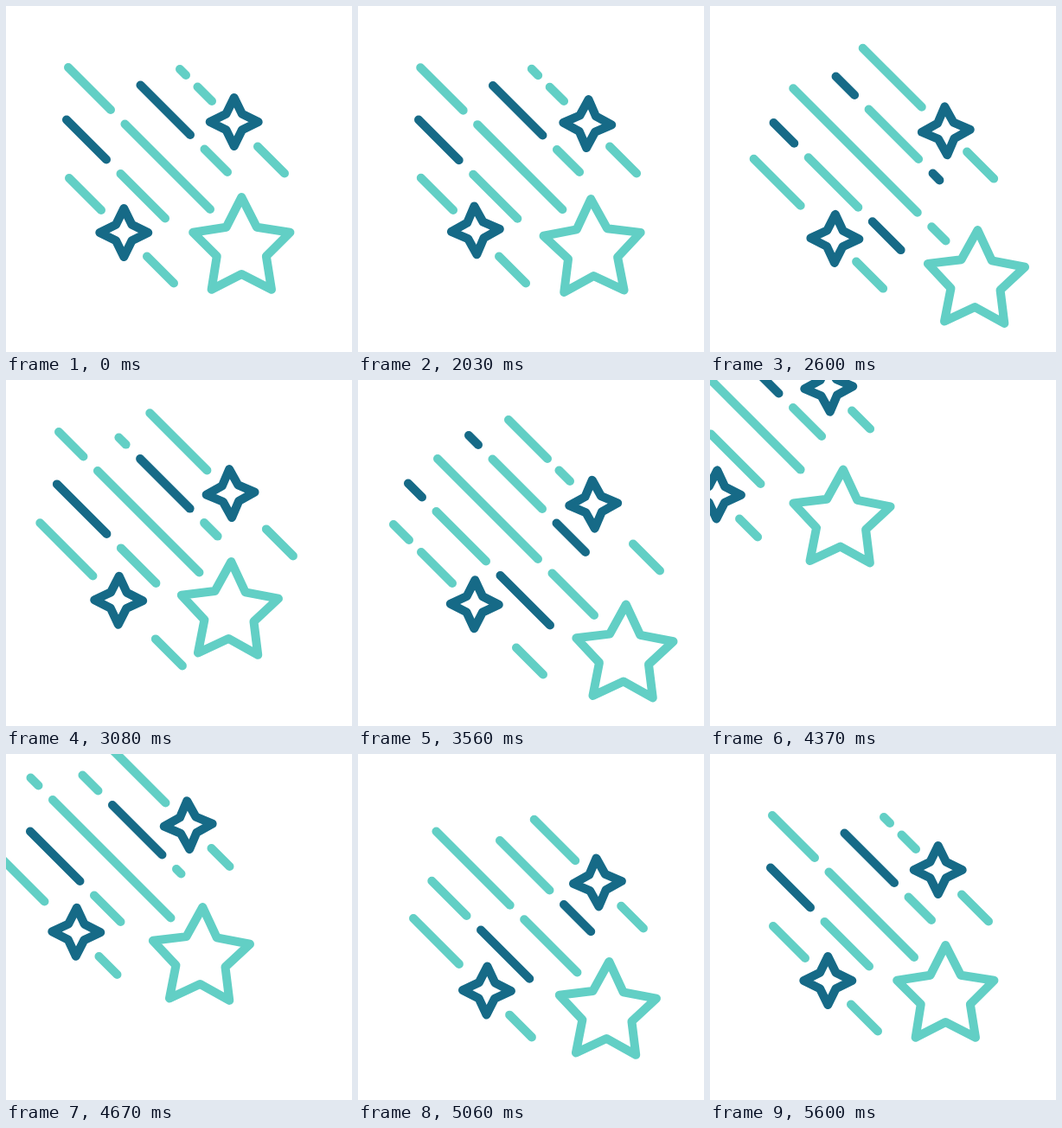
An HTML page with a canvas that plays this animation: 400 by 400 pixels, repeating every 5660 ms.

```html
<!DOCTYPE html>
<html lang="en">
<head>
<meta charset="utf-8">
<title>Shooting stars</title>
<style>
  html, body { margin: 0; height: 100%; overflow: hidden; background: #fff; }
  canvas { display: block; }
</style>
</head>
<body>
<canvas width="400" height="400"></canvas>
<script>
const ctx = document.querySelector('canvas').getContext('2d');
const LIGHT = '#62cfc5', DARK = '#166a87';
const REST = 2030, STEP = 30, LOOP = 5660, LAST = 120;

const clamp = u => Math.max(0, Math.min(1, u));
const smooth = u => { u = clamp(u); return u * u * (3 - 2 * u); };
const mix = (a, b, u) => a + (b - a) * u;

// Diagonal offsets: lunge, wind-up, launch, and lag behind the star on return
const STAR = [38, -14, 37, 0], UPPER = [10, -4, 9, -7], LOWER = [8, -7, -2, -10];

// Dashes flow along each track, relative to the track's front end
const FLOW_STEPS = [0, 36, 52, 89, LAST];
const MAIN_FLOW = [0, 159, 215, 317, 444];

const tracks = [
  { c: 1, tail: 72, head: 236, tailMove: [25, -12, 20, 2], headMove: STAR,
    period: 160, gap: 16.5, phase: -115, flow: [0, 141, 210, 282, 480], colors: [LIGHT, LIGHT] },
  { c: 64, tail: 142, head: 256, tailMove: [4, -12, -14, -8], headMove: [10, -12, 7, -8],
    period: 74, gap: 16.5, phase: -43, flow: MAIN_FLOW, colors: [DARK, LIGHT] },
  { c: -61.5, tail: 70, head: 184, tailMove: [4, -12, -12, -4], headMove: [38, -12, 39, -6],
    period: 74, gap: 16.5, phase: -68, flow: MAIN_FLOW, colors: [DARK, LIGHT] },
  { c: 128, tail: 201, head: 238, tailMove: [-24, -35, -27, -52], headMove: [8, -6, 7, -8],
    period: 100, gap: 13.5, phase: -30, flow: [0, 50, 104, 150, 200], colors: [LIGHT, LIGHT] },
  { c: -126, tail: 73, head: 110, tailMove: [-22, -34, -32, -50], headMove: [6, -10, -1, -20],
    period: 100, gap: 14, phase: -54, flow: [0, 74, 104, 174, 200], colors: [LIGHT, LIGHT] },
];
const sparks = [
  { c: 128.5, tail: 291, head: 322, move: [6, 10, 27, -8] },
  { c: -126.5, tail: 163, head: 194, move: [6, 10, 20, -10] },
];
// tilt and nudge each hold a first and a second pose
const stars = [
  { x: 272.3, y: 280, points: 5, outer: 59, inner: 30, color: LIGHT, move: STAR,
    tilt: [-2, 2], nudge: [[-1.4, 1.7], [-1.5, 1.5]] },
  { x: 263.7, y: 134, points: 4, outer: 28, inner: 13, color: DARK, move: UPPER,
    tilt: [2.5, -3], nudge: [[1.5, 2], [-0.5, 0.7]] },
  { x: 136.3, y: 262, points: 4, outer: 28, inner: 13, color: DARK, move: LOWER,
    tilt: [-3, 1], nudge: [[-0.5, -2.7], [0.5, -0.7]] },
];

function leave(m, n) {
  if (n < 18) return mix(0, m[0], smooth(n / 18));
  if (n < 38) return mix(m[0], m[1], smooth((n - 18) / 20));
  if (n < 52) return mix(m[1], m[2], ((n - 38) / 14) ** 2);
  return m[2] + 6 * (n - 52) + 2.2 * (n - 52) ** 2;
}

function arrive(m, n) {
  const travel = n < 105 ? 23 - 356 * ((105 - n) / 48) ** 1.5
                         : 23 * (1 - smooth((n - 105) / 11));
  return travel + m[3] * (1 - smooth((n - 89) / 27));
}

// The flow starts from rest and comes back to rest
function flowAt(flow, n) {
  let i = 0;
  while (i < 3 && n > FLOW_STEPS[i + 1]) i++;
  const u = (n - FLOW_STEPS[i]) / (FLOW_STEPS[i + 1] - FLOW_STEPS[i]);
  return mix(flow[i], flow[i + 1], i === 0 || i === 3 ? smooth(u) : u);
}

function line(c, from, to, color) {
  ctx.strokeStyle = color;
  ctx.beginPath();
  ctx.moveTo(from, from - c);
  ctx.lineTo(to, to - c);
  ctx.stroke();
}

function drawTrack(t, n, shift) {
  const tail = t.tail + shift(t.tailMove, n);
  const head = t.head + shift(t.headMove, n);
  const edge = head + t.phase + flowAt(t.flow, n);
  for (let k = -1; k < 12; k++) {
    const end = edge - k * t.period;
    const from = Math.max(tail, end - t.period + t.gap), to = Math.min(head, end);
    if (to > from) line(t.c, from, to, t.colors[k & 1]);
  }
}

function drawStar(s, n, shift) {
  const d = shift(s.move, n);
  const still = n === 0 || n === LAST;
  const pose = n < 8 || n > 114 ? 0 : 1;
  const [dx, dy] = still ? [0, 0] : s.nudge[pose];
  const tilt = still ? 0 : s.tilt[pose] * Math.PI / 180;
  ctx.strokeStyle = s.color;
  ctx.beginPath();
  for (let i = 0; i < 2 * s.points; i++) {
    const r = i % 2 ? s.inner : s.outer, a = tilt + i * Math.PI / s.points;
    ctx.lineTo(s.x + d + dx + r * Math.sin(a), s.y + d + dy - r * Math.cos(a));
  }
  ctx.closePath();
  ctx.stroke();
}

function drawGroup(n, shift) {
  for (const t of tracks) drawTrack(t, n, shift);
  for (const s of sparks) {
    const d = shift(s.move, n);
    const shrink = shift === arrive ? 10 * (1 - smooth((n - 89) / 27)) : 0;
    line(s.c, s.tail + d, s.head + d - shrink, LIGHT);
  }
  for (const s of stars) drawStar(s, n, shift);
}

function draw(now) {
  const t = now % LOOP;
  const n = t < REST ? 0 : Math.min(LAST, Math.floor((t - REST) / STEP) + 1);
  ctx.fillStyle = '#fff';
  ctx.fillRect(0, 0, 400, 400);
  ctx.lineWidth = 10;
  ctx.lineCap = ctx.lineJoin = 'round';
  if (n < 67) drawGroup(n, leave);
  if (n > 57) drawGroup(n, arrive);
}

const start = performance.now();
function loop() {
  draw(performance.now() - start);
  requestAnimationFrame(loop);
}
loop();
</script>
</body>
</html>
```
